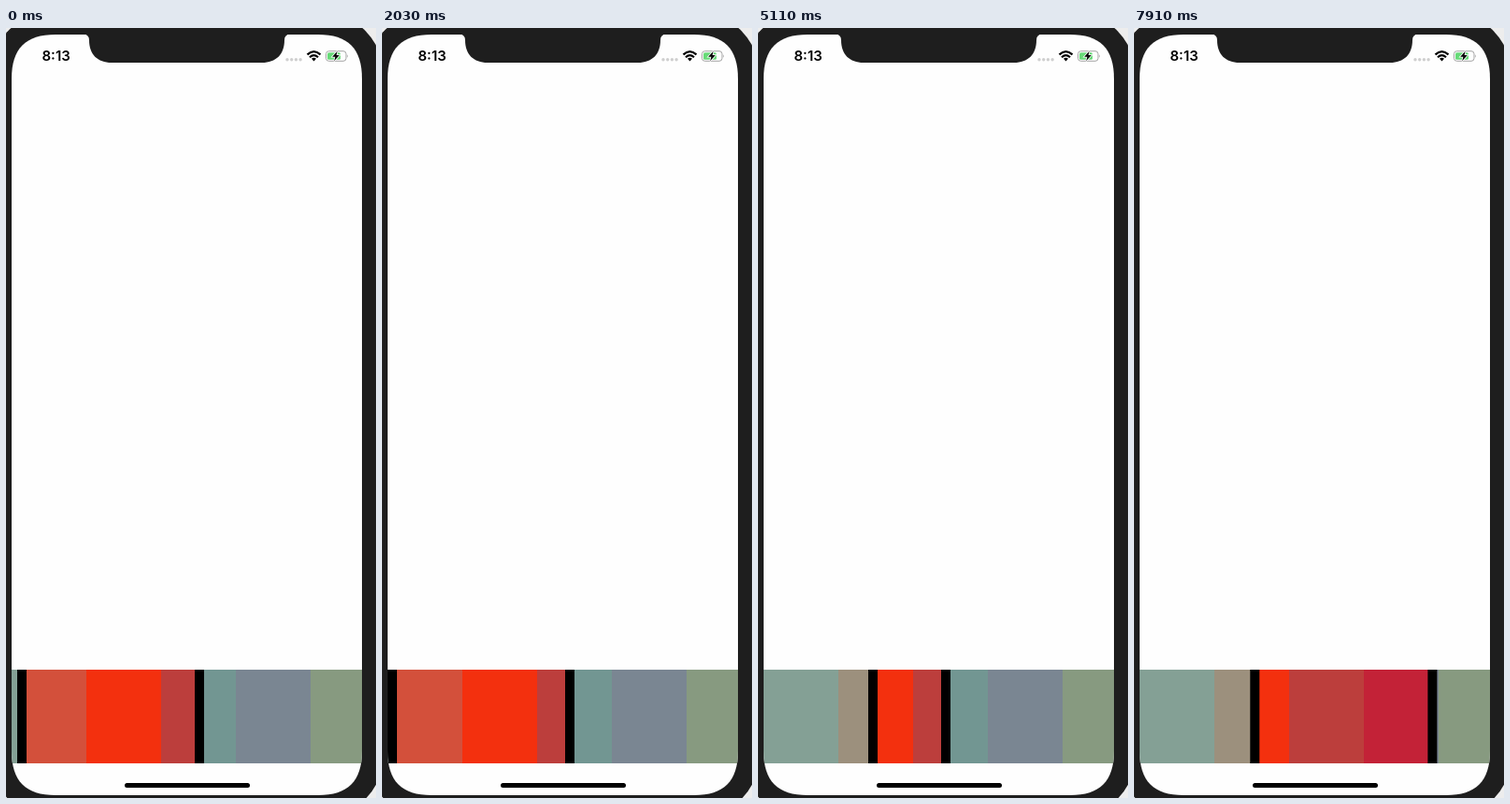
An HTML page that plays this animation: 396x822 px, repeating every 8 s.

```html
<!DOCTYPE html>
<html lang="en">
<head>
<meta charset="utf-8">
<title>Range slider</title>
<style>
  html, body { margin: 0; width: 100%; height: 100%; overflow: hidden; background: #ededed; }
  svg { display: block; }
  text { font: 600 15px Inter, Roboto, sans-serif; }
</style>
</head>
<body>
<svg width="396" height="822" viewBox="0 0 396 822">
  <defs>
    <clipPath id="screen">
      <path id="outline" d="M6 54C6 22 21 7 53 7H334C366 7 381 22 381 54V772C381 804 366 819 334 819H53C21 819 6 804 6 772Z"/>
    </clipPath>
    <clipPath id="range"><rect id="window" y="685" height="100"/></clipPath>
  </defs>

  <rect x="-16" y="-15" width="419" height="856" rx="62" fill="#1e1e1e"/>
  <use href="#outline" fill="#fefefe"/>

  <g clip-path="url(#screen)">
    <g id="dull"></g>
    <g id="vivid" clip-path="url(#range)"></g>
    <rect id="left" y="685" width="10" height="100"/>
    <rect id="right" y="685" width="10" height="100"/>
  </g>

  <path d="M83 6.5Q89 7 89 13C89 28 98 37 113 37H274C289 37 298 28 298 13Q298 7 304 6.5Z" fill="#1e1e1e"/>
  <text x="38.5" y="35">8:13</text>
  <g fill="#cfcfcf">
    <circle cx="301" cy="33.7" r="1.7"/><circle cx="305.7" cy="33.7" r="1.7"/>
    <circle cx="310.4" cy="33.7" r="1.7"/><circle cx="315.1" cy="33.7" r="1.7"/>
  </g>
  <g fill="none" stroke="#000" stroke-width="2.2">
    <path d="M322.5 28.4Q329.5 21.8 336.5 28.4M325 31.2Q329.5 27 334 31.2"/>
    <path d="M327 32.8Q329.5 30.8 332 32.8L329.5 35.6Z" fill="#000" stroke="none"/>
  </g>
  <rect x="342.5" y="24.7" width="21.5" height="10.6" rx="3" fill="none" stroke="#a4a4a4"/>
  <rect x="344" y="26.2" width="14" height="7.6" rx="1.6" fill="#67da78"/>
  <path d="M365.2 28.3Q367 30 365.2 31.7Z" fill="#a4a4a4"/>
  <path d="M354.6 24.8L349.2 30.8H352.4L351.2 35.2L356.8 29H353.6Z" stroke="#fff" stroke-width="1.6" paint-order="stroke"/>
  <rect x="127" y="806" width="134" height="5" rx="2.5"/>
</svg>
<script>
const LOOP = 8000, STEP = 70, TILE = 80, START = 6, HANDLE = 10;
const dullColors = ["#84a095", "#9c907d", "#729692", "#7a8692", "#879a80"];
const vividColors = ["#d3503b", "#f3300e", "#bc3e3c", "#c32237", "#c32237"];

// Each key is [time, position].
const leftKeys = [[0, 12], [560, 6], [2030, 6], [2310, 10], [4060, 10], [4270, 46], [5110, 118], [5390, 124.3]];
const rightKeys = [[0, 202], [560, 196], [5670, 196], [6090, 290], [6160, 290], [6440, 314.4]];

const el = id => document.getElementById(id);

function addTiles(id, colors) {
  el(id).innerHTML = colors.map((color, i) =>
    `<rect x="${START + i * TILE}" y="685" width="${TILE}" height="100" fill="${color}"/>`).join("");
}

function positionAt(keys, time) {
  const next = keys.findIndex(key => key[0] > time);
  if (next < 0) return keys[keys.length - 1][1];
  const [t0, x0] = keys[next - 1], [t1, x1] = keys[next];
  const progress = (time - t0) / (t1 - t0);
  const eased = next === 1 ? 1 - (1 - progress) ** 2 : progress;
  return x0 + (x1 - x0) * eased;
}

function draw() {
  const time = Math.floor(performance.now() % LOOP / STEP) * STEP;
  const left = positionAt(leftKeys, time), right = positionAt(rightKeys, time);
  el("left").setAttribute("x", left);
  el("right").setAttribute("x", right);
  el("window").setAttribute("x", left + HANDLE / 2);
  el("window").setAttribute("width", right - left);
  requestAnimationFrame(draw);
}

addTiles("dull", dullColors);
addTiles("vivid", vividColors);
draw();
</script>
</body>
</html>
```
